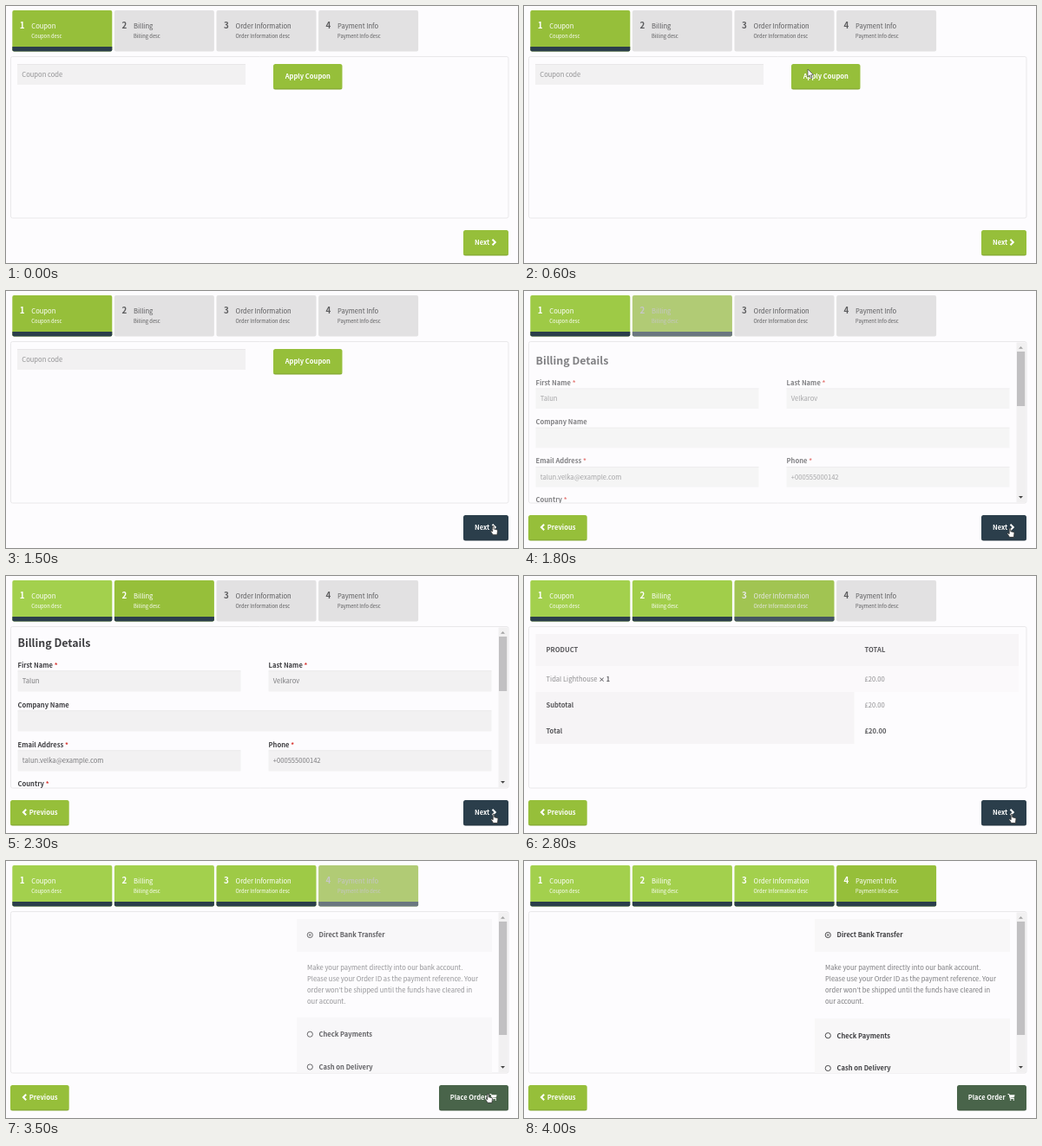
Recreate the animation shown at these times as an HTML page with a canvas. Size 590 px wide and 297 px high, loop 4100 ms.

```html
<!DOCTYPE html>
<html lang="en">
<head>
<meta charset="utf-8">
<title>Checkout steps</title>
<style>
  html, body { margin: 0; width: 100%; height: 100%; overflow: hidden; background: #fdfcfe; }
  canvas { display: block; width: 590px; height: 297px; }
</style>
</head>
<body>
<canvas id="stage"></canvas>
<script>
const W = 590, H = 297, LOOP = 4100, STEP = 100;
const FONT = '"Noto Sans CJK JP", "Noto Sans CJK SC", "Noto Sans CJK KR", "Open Sans", sans-serif';
const GREY = [226, 225, 226], GREEN = [150, 191, 58], LIME = [163, 208, 77];
const NAVY = [43, 62, 75], WHITE = [255, 255, 255], INK = [92, 92, 94];
const PAPER = '#fdfcfe', FIELD = '#f2f1f2', DARK = '#3d3d40', MUTED = '#7b7b7e';

const canvas = document.getElementById('stage');
const ctx = canvas.getContext('2d');
const dpr = window.devicePixelRatio || 1;
canvas.width = W * dpr;
canvas.height = H * dpr;

const rgb = c => `rgb(${c.map(Math.round).join(',')})`;
const mix = (a, b, p) => a.map((v, i) => v + (b[i] - v) * p);
const prog = (t, start, dur) => Math.min(1, Math.max(0, (t - start) / dur));

function box(x, y, w, h, fill, r = 0) {
  ctx.fillStyle = fill;
  ctx.beginPath();
  ctx.roundRect(x, y, w, h, r);
  ctx.fill();
}

function text(str, x, y, color = DARK, size = 7.6, weight = 400) {
  ctx.font = `${weight} ${size}px ${FONT}`;
  ctx.fillStyle = color;
  ctx.fillText(str, x, y);
  return ctx.measureText(str).width;
}

const bold = (str, x, y, color = DARK, size = 7.6) => text(str, x, y, color, size, 700);

function line(points, color, width, close) {
  ctx.beginPath();
  points.forEach(([x, y]) => ctx.lineTo(x, y));
  if (close) ctx.closePath();
  ctx.strokeStyle = color;
  ctx.lineWidth = width;
  ctx.stroke();
}

function ring(x, y, r, color, width) {
  ctx.beginPath();
  ctx.arc(x, y, r, 0, Math.PI * 2);
  ctx.strokeStyle = color;
  ctx.lineWidth = width;
  ctx.stroke();
}

function fade(alpha, draw) {
  if (alpha <= 0) return;
  ctx.save();
  ctx.globalAlpha = alpha;
  draw();
  ctx.restore();
}

// Step tabs
const TABS = ['Coupon', 'Billing', 'Order Information', 'Payment Info'];

function drawTabs(active) {
  TABS.forEach((name, i) => {
    const x = 7.3 + i * 117.6, a = active[i], done = active[i + 1] || 0;
    const fill = mix(mix(GREY, GREEN, a), LIME, done);
    const ink = rgb(mix(INK, WHITE, a));
    box(x, 5, 115, 47.5, rgb(fill), 2);
    if (a > 0) box(x, 47, 115, 5.5, rgb(mix(GREY, NAVY, a)), [0, 0, 2, 2]);
    bold(i + 1, x + 8.5, 26.2, ink, 9.8);
    text(name, x + 22, 26.2, ink);
    text(name + ' desc', x + 22, 37.3, ink, 5.8);
  });
}

// Buttons
function button(x, y, w, color) {
  box(x, y, w, 29.5, color, 2.5);
  box(x, y + 28.3, w, 1.2, 'rgba(0,0,0,.12)', [0, 0, 2.5, 2.5]);
}

const chevron = (x, y, d) => line([[x, y - 3.3], [x + d * 3.3, y], [x, y + 3.3]], '#fff', 2);

function cart(x, y) {
  line([[x, y], [x + 1.6, y], [x + 2.8, y + 5], [x + 7.4, y + 5]], '#fff', 1);
  ctx.fillStyle = '#fff';
  ctx.beginPath();
  [[1.9, .8], [8, .8], [7.4, 3.8], [2.6, 4.2]].forEach(([dx, dy]) => ctx.lineTo(x + dx, y + dy));
  ctx.fill();
  box(x + 2.4, y + 5.8, 1.6, 1.6, '#fff', .8);
  box(x + 6, y + 5.8, 1.6, 1.6, '#fff', .8);
}

function drawButtons(t, active) {
  if (active[1] > 0) {
    button(5, 259, 67.7, rgb(GREEN));
    chevron(23.2, 273, -1);
    bold('Previous', 26.8, 275.8, '#fff');
  }
  if (active[3] > 0) {
    button(499, 259, 80, '#49644a');
    bold('Place Order', 511.7, 275.8, '#fff', 7.5);
    cart(557.5, 269.5);
  } else {
    button(527, 259, 52, rgb(mix(GREEN, NAVY, prog(t, 1300, 200))));
    bold('Next', 540, 275.8, '#fff');
    chevron(560.5, 273, 1);
  }
}

// Panel pages
function field(x, y, w, value, color = MUTED) {
  box(x, y, w, 24, FIELD);
  box(x, y, w, .8, '#e6e5e6');
  text(value, x + 5.3, y + 14.8, color);
}

function label(str, x, y, required = true) {
  const w = bold(str + ' ', x, y);
  if (required) bold('*', x + w, y, '#d8342f');
}

function couponPage() {
  field(13, 67, 263, 'Coupon code', '#929294');
  button(308, 67, 79.5, rgb(GREEN));
  bold('Apply Coupon', 321.7, 84.3, '#fff');
}

function billingPage(p) {
  const pivot = 305;
  ctx.translate(0, pivot);
  ctx.scale(1, 1 - .043 * (1 - p));
  ctx.translate(0, -pivot);
  bold('Billing Details', 13.5, 81.8, DARK, 12.4);
  label('First Name', 13.5, 105.7);
  label('Last Name', 302.5, 105.7);
  field(13.5, 109.5, 257, 'Talun');
  field(302.5, 109.5, 257, 'Velkarov');
  label('Company Name', 13.5, 151.5, false);
  field(13.5, 155.5, 546, '');
  label('Email Address', 13.5, 197.5);
  label('Phone', 302.5, 197.5);
  field(13.5, 201.5, 257, 'talun.velka@example.com');
  field(302.5, 201.5, 257, '+000555000142');
  label('Country', 13.5, 243.3);
}

function orderPage() {
  const left = 25.5, right = 392.5;
  box(13.5, 67, 556.5, 37, '#f6f5f6');
  box(13.5, 104, 556.5, 30, '#fbfafb');
  box(13.5, 134, 367, 60, '#f5f4f5');
  bold('PRODUCT', left, 88.3);
  bold('TOTAL', right, 88.3);
  text('Tidal Lighthouse', left, 121.7, MUTED);
  bold('× 1', 86, 121.7, DARK, 7.2);
  text('£20.00', right, 121.7, MUTED);
  bold('Subtotal', left, 152);
  text('£20.00', right, 152, MUTED);
  bold('Total', left, 182);
  bold('£20.00', right, 182);
}

function option(name, y, checked) {
  ring(350.3, y, 3.1, '#4a4a4c', 1);
  if (checked) ring(350.3, y, .9, '#4a4a4c', .9);
  bold(name, 360.5, y + 2.8);
}

function paymentPage(p) {
  const slide = -4.3 * (1 - p);
  box(335, 67, 225, 38, '#f8f7f8');
  box(335, 182 + slide, 225, 70, '#f8f7f8');
  option('Direct Bank Transfer', 85.5, true);
  [
    'Make your payment directly into our bank account.',
    'Please use your Order ID as the payment reference. Your',
    'order won’t be shipped until the funds have cleared in',
    'our account.'
  ].forEach((row, i) => text(row, 347, 125.7 + i * 13.1, MUTED));
  option('Check Payments', 201.7 + slide);
  option('Cash on Delivery', 239.5 + slide);
}

function scrollbar(thumb) {
  const arrow = (y, d, color) => {
    ctx.fillStyle = color;
    ctx.beginPath();
    ctx.moveTo(570, y);
    ctx.lineTo(575, y);
    ctx.lineTo(572.5, y + d);
    ctx.fill();
  };
  box(567.5, 59.5, 10.5, 185, '#f1f0f1');
  box(568, 70, 9.2, thumb, '#c1c0c2');
  arrow(66.7, -2.8, '#a3a3a3');
  arrow(237, 2.8, '#444');
}

function drawPanel(t, active) {
  const [, billing, order, payment] = active;
  ctx.strokeStyle = '#e9e8ea';
  ctx.lineWidth = 1;
  ctx.beginPath();
  ctx.roundRect(5.5, 58.5, 573.5, 186.5, 2);
  ctx.stroke();
  ctx.save();
  ctx.clip();
  fade(billing > 0 ? 0 : 1, couponPage);
  fade(billing * (1 - prog(t, 2450, 120)), () => billingPage(billing));
  fade(order * (1 - prog(t, 3050, 300)), orderPage);
  fade(Math.sqrt(payment), () => paymentPage(payment));
  if (billing > 0 && order === 0) scrollbar(63);
  if (payment > 0) scrollbar(131);
  ctx.restore();
}

// Pointer: time, x, y
const PATH = [
  [300, 460, 73], [400, 460, 73], [500, 400, 67], [700, 253, 78], [800, 350, 112],
  [1000, 570, 195], [1200, 577, 232], [1400, 563, 268], [1600, 560, 273.5],
  [2200, 560, 273.5], [2300, 562, 274.5], [3100, 562, 274.5], [3400, 555.5, 268.5], [3900, 555.5, 268.5]
];

function pointerAt(t) {
  const i = PATH.findIndex(p => p[0] > t);
  if (i < 1) return null;
  const [t0, x0, y0] = PATH[i - 1], [t1, x1, y1] = PATH[i];
  const p = (t - t0) / (t1 - t0);
  return [x0 + (x1 - x0) * p, y0 + (y1 - y0) * p];
}

function outline(points, x, y, color) {
  const moved = points.map(([dx, dy]) => [x + dx, y + dy]);
  ctx.fillStyle = '#fff';
  ctx.beginPath();
  moved.forEach(p => ctx.lineTo(...p));
  ctx.fill();
  line(moved, color, .8, true);
}

const ARROW = [[.5, .5], [.5, 9.5], [2.6, 7.6], [4.2, 11.2], [5.6, 10.6], [4.1, 7.2], [7, 7.1]];
const HAND = [[-.8, .8], [.6, .8], [.8, 4.3], [4.6, 5.2], [5, 6.3], [4.4, 11], [-.4, 11], [-3, 7], [-2.4, 6.2], [-.8, 7.2]];

function drawPointer(t) {
  const at = pointerAt(t);
  if (!at) return;
  const [x, y] = at;
  if (t >= 1400) return outline(HAND, x, y, '#333');
  outline(ARROW, x, y, '#555');
  if (t >= 1000 && t < 1200) {
    ring(x + 8, y + 2.2, 3.3, '#a2a2a6', 1.6);
  }
}

function frame(now) {
  const t = Math.floor((now % LOOP) / STEP) * STEP;
  const active = [1, prog(t, 1670, 200), prog(t, 2560, 280), prog(t, 3370, 200)];
  ctx.setTransform(dpr, 0, 0, dpr, 0, 0);
  box(0, 0, W, H, PAPER);
  drawTabs(active);
  drawPanel(t, active);
  drawButtons(t, active);
  drawPointer(t);
}

const start = performance.now();
function tick() {
  frame(performance.now() - start);
  requestAnimationFrame(tick);
}
tick();
</script>
</body>
</html>
```
